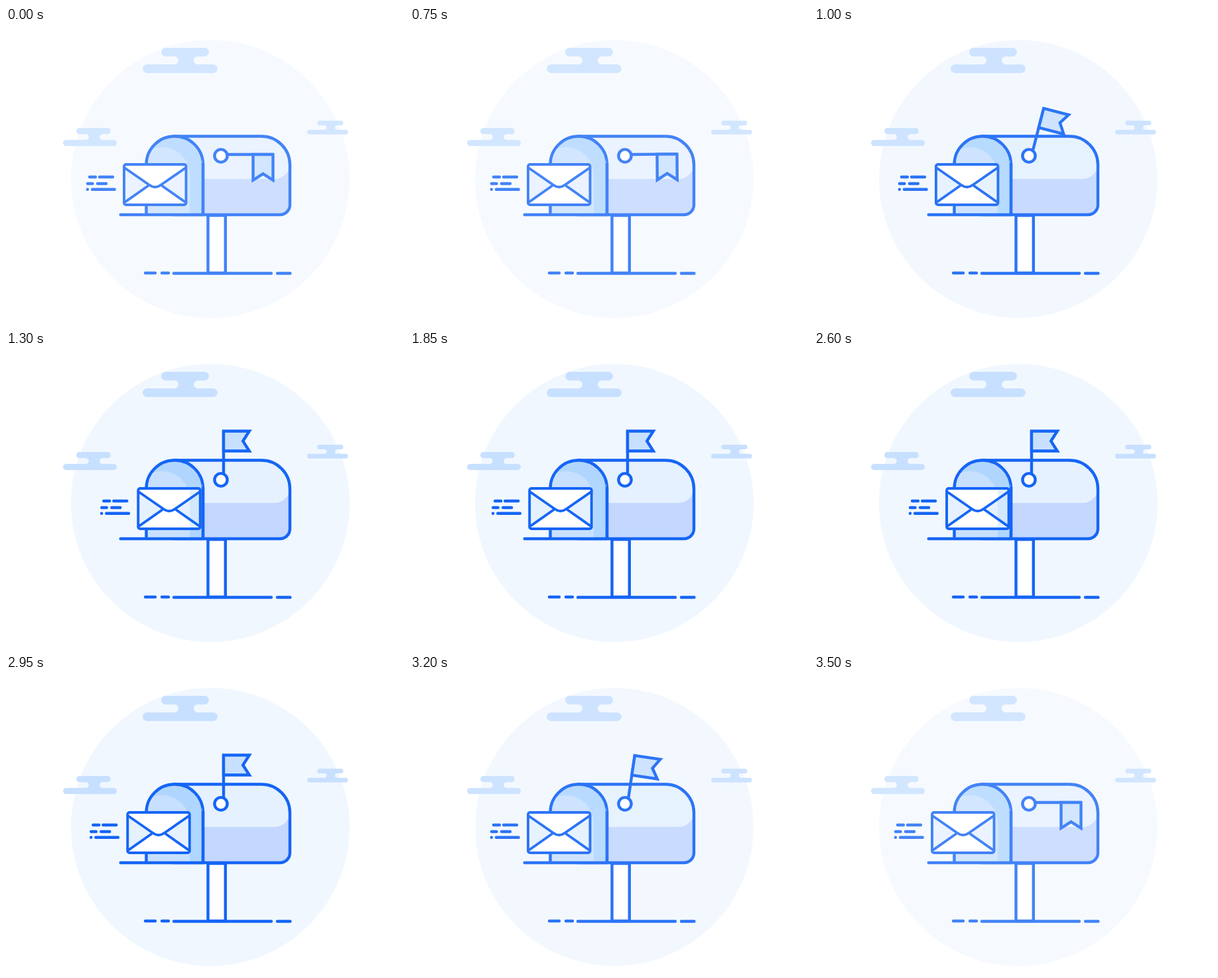
An HTML page for the animation above (3550 ms loop, 600 by 447 pixels).

```html
<!DOCTYPE html>
<html lang="en">
<head>
<meta charset="utf-8">
<title>Mailbox</title>
<style>
  html, body { margin: 0; width: 100%; height: 100%; overflow: hidden; background: #fff; }
  svg { display: block; width: 100%; height: 100%; }
  .line { fill: none; stroke: #1565f5; stroke-width: 4.4; }
  .round { stroke-linecap: round; stroke-linejoin: round; }
  .white { fill: #fff; }
  .cloud { fill: #c8e0ff; }
  .pale { fill: #e5f1ff; }
  .shade { fill: #c3d7ff; }
  .rim { fill: #b0d6ff; }
</style>
</head>
<body>
<svg viewBox="0 0 600 447">
  <defs>
    <path id="cloud" d="M6.5 25H48A6 6 0 0 0 48 13H34.5A6.5 6.5 0 0 1 34.5 0H93.5A6.5 6.5 0 0 1 93.5 13H83A6 6 0 0 0 83 25H106.5A6.5 6.5 0 0 1 106.5 38H6.5A6.5 6.5 0 0 1 6.5 25Z"/>
    <path id="door" d="M211.5 282V206A42.75 42.5 0 0 1 297 206V282"/>
    <path id="body" d="M254 163.5H385A43 43 0 0 1 428 206.5V267A15 15 0 0 1 413 282H254Z"/>
    <clipPath id="inDoor"><use href="#door"/></clipPath>
    <clipPath id="inBody"><use href="#body"/></clipPath>
  </defs>

  <g id="scene">
    <circle id="backdrop" cx="308" cy="228" r="210" fill="#f0f7ff"/>
    <g class="cloud">
      <use href="#cloud" transform="translate(206 30)"/>
      <use href="#cloud" transform="translate(86 151) scale(.717)"/>
      <use href="#cloud" transform="translate(454 140) scale(.545)"/>
    </g>

    <path class="line round" d="M210 370H225M235 370H245M253 370.5H400M409 370.5H428.5"/>
    <path class="line white" d="M304.5 283H330.8V370H304.5Z"/>

    <g clip-path="url(#inBody)">
      <path class="shade" d="M254 160H432V286H254Z"/>
      <path class="pale" d="M254 160H428V205A23 23 0 0 1 405 228H254Z"/>
    </g>
    <use href="#body" class="line"/>

    <use href="#door" class="rim"/>
    <path class="cloud" clip-path="url(#inDoor)" d="M193 282V222A42 42 0 0 1 277 222V282Z"/>
    <use href="#door" class="line"/>
    <path class="line round" d="M172.7 282H297"/>

    <g id="letter">
      <path class="line round" d="M126 225H135M141 225H161M123 235H130.5M138 235H151M122.8 243.7H123M130 243.7H163.7"/>
      <rect class="white" x="178" y="206" width="93.5" height="61" rx="3"/>
      <path class="pale" d="M178 210L215 237L178 263ZM271.5 210L234 237L271.5 263Z"/>
    </g>
    <path class="rim" opacity=".35" clip-path="url(#inDoor)" d="M277 200H297V270H277Z"/>
    <g id="letterLines" class="line round" style="stroke-width:3.9">
      <rect x="178" y="206" width="93.5" height="61" rx="3"/>
      <path d="M178.5 211L216 237Q224.7 243.5 233.5 237L271 211M178.5 263.5L214 238.5M271 263.5L235.5 238.5"/>
    </g>
    <path class="line" d="M297 204V282"/>

    <g id="flag">
      <path class="line" d="M328 190V119.5"/>
      <path class="line" style="fill:#c8e0ff" d="M328 119.5H366.8L357.2 134.5L366.8 149.5H328Z"/>
    </g>
    <circle class="line white" cx="324" cy="193" r="9.6"/>
  </g>
</svg>

<script>
  const LOOP = 3550;
  const WAKE = 750, SLEEP = 2950, TURN = 550;   // start of each change, and its length
  const SLIDE_START = 800, SLIDE_PERIOD = 1170, SLIDE_CYCLES = 2, SLIDE_REACH = 22.4;

  const part = id => document.getElementById(id);
  const progress = (t, start, length) => Math.min(1, Math.max(0, (t - start) / length));

  function slideOffset(t) {
    const turns = progress(t, SLIDE_START, SLIDE_PERIOD * SLIDE_CYCLES) * SLIDE_CYCLES;
    return SLIDE_REACH * (1 - Math.cos(turns * 2 * Math.PI)) / 2;
  }

  // 0 = flag lowered, 1 = flag upright
  function flagLift(t) {
    const rise = 1 - (1 - progress(t, WAKE, TURN)) ** 3;
    const fall = progress(t, SLEEP, TURN) ** 3;
    return rise - fall;
  }

  function draw(t) {
    const vivid = progress(t, WAKE, 500) - progress(t, SLEEP, 500);
    part('scene').setAttribute('opacity', 0.8 + 0.2 * vivid);
    part('backdrop').setAttribute('opacity', 0.75 + 0.25 * vivid);

    const shift = `translate(${slideOffset(t)} 0)`;
    part('letter').setAttribute('transform', shift);
    part('letterLines').setAttribute('transform', shift);

    part('flag').setAttribute('transform', `rotate(${90 * (1 - flagLift(t))} 329.5 192.5)`);
  }

  const begin = performance.now();
  function tick() {
    draw((performance.now() - begin) % LOOP);
    requestAnimationFrame(tick);
  }
  tick();
</script>
</body>
</html>
```
